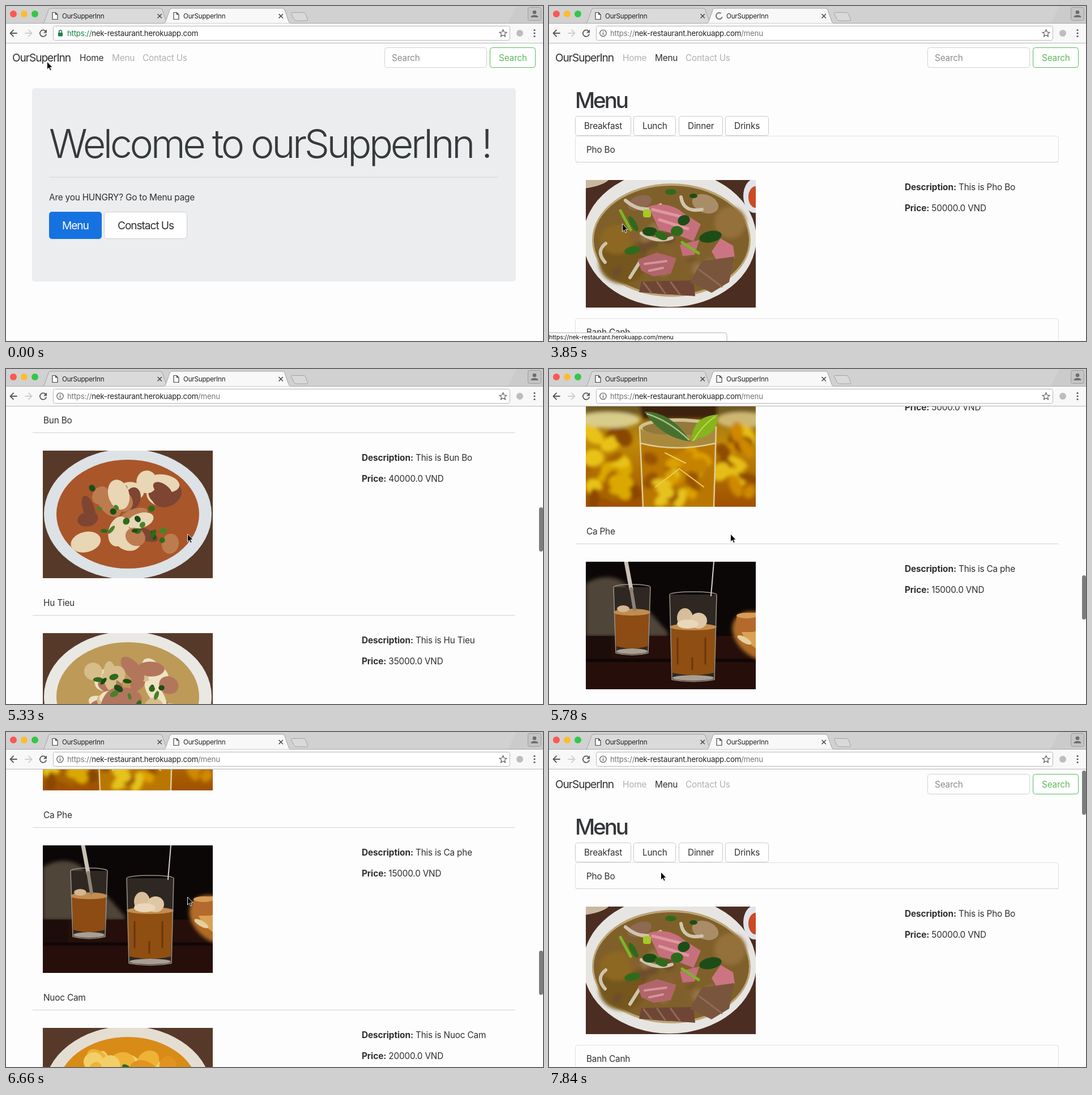
An HTML page for the animation above (7.99 s loop, 948 px wide and 591 px high).

```html
<!DOCTYPE html>
<html lang="en">
<head>
<meta charset="utf-8">
<title>OurSupperInn</title>
<style>
html, body { margin: 0; width: 100%; height: 100%; overflow: hidden; background: #fdfdfd; }
svg { display: block; width: 948px; height: 591px; }
text { font-family: Inter, Roboto, "Liberation Sans", sans-serif; fill: #2d2f31; white-space: pre; }
.body { font-size: 15.4px; letter-spacing: -.23px; }
.strong { font-weight: 700; letter-spacing: -.1px; }
.big { font-size: 19.2px; letter-spacing: -1.1px; }
.hero { font-size: 70px; font-weight: 300; letter-spacing: -4.4px; fill: #373a3c; }
.title { font-size: 38.6px; font-weight: 500; letter-spacing: -3.1px; fill: #343639; }
.tab { font-size: 11.7px; letter-spacing: -.25px; fill: #222; }
.url { font-size: 13.3px; letter-spacing: -.24px; fill: #222; }
.status { font-size: 10.7px; letter-spacing: -.12px; fill: #111; }
</style>
</head>
<body>
<svg id="stage" viewBox="0 0 948 591"></svg>
<script>
const LOOP = 7990, PITCH = 322, MAX = 2844;
const HOST = 'nek-restaurant.herokuapp.com';
const INK = '#2d2f31', FAINT = '#afb1b3';

const text = (x, y, s, cls = 'body', fill = '') =>
  `<text x="${x}" y="${y}" class="${cls}"${fill && ` style="fill:${fill}"`}>${s}</text>`;
const box = (x, y, w, h, fill, stroke = 'none', r = 0) =>
  `<rect x="${x}" y="${y}" width="${w}" height="${h}" rx="${r}" fill="${fill}" stroke="${stroke}"/>`;
const oval = (x, y, rx, ry, fill, turn = 0) =>
  `<ellipse cx="${x}" cy="${y}" rx="${rx}" ry="${ry}" fill="${fill}" transform="rotate(${turn} ${x} ${y})"/>`;
const shape = (d, fill) => `<path d="${d}" fill="${fill}"/>`;
const line = (d, stroke, w = 1) =>
  `<path d="${d}" fill="none" stroke="${stroke}" stroke-width="${w}" stroke-linecap="round" stroke-linejoin="round"/>`;
const group = (id, inner) => `<g id="${id}">${inner}</g>`;
const soften = inner => `<g filter="url(#soft)">${inner}</g>`;
const fade = (id, ...stops) => `<linearGradient id="${id}" x2="0" y2="1">` +
  stops.map((c, i) => `<stop offset="${i / (stops.length - 1)}" stop-color="${c}"/>`).join('') + '</linearGradient>';

let seed = 7;
const rnd = (a, b) => {
  seed = seed * 16807 % 2147483647;
  return a + (b - a) * seed / 2147483647;
};
const scatter = (n, x, y, w, h, size, fills) => Array.from({ length: n }, (_, i) =>
  oval(rnd(x - w, x + w).toFixed(1), rnd(y - h, y + h).toFixed(1), rnd(size / 2, size).toFixed(1),
    rnd(size / 3, size * .7).toFixed(1), fills[i % fills.length], rnd(0, 180) | 0)).join('');

// Food pictures, each 300 by 225
const GREENS = ['#2f6a1c', '#1d4d16', '#47822a'];

const pho = () => box(0, 0, 300, 225, '#4b2d22') + oval(8, 4, 34, 9, '#c9b8a0', -12) +
  oval(298, 28, 20, 30, '#dfe3ea') + oval(300, 30, 13, 19, '#c94a25') +
  oval(148, 103, 153, 121, '#e7e5e2') + oval(151, 106, 140, 100, '#bba578') + oval(151, 106, 137, 96, '#80602a') +
  soften(oval(65, 145, 42, 38, '#75571a') + oval(55, 105, 30, 26, '#8d6820') + oval(255, 75, 28, 28, '#94703a') +
    scatter(18, 145, 110, 90, 62, 18, ['#6d4d2c', '#937346', '#86602f'])) +
  oval(95, 40, 22, 12, '#8d6a51', -20) + oval(211, 42, 24, 16, '#a98d68', 20) +
  line('M70 36Q100 62 132 44M168 30Q172 58 205 52M98 94Q125 112 152 102M35 112Q17 126 34 145M95 145L78 172', '#cfc5ac', 6) +
  shape('M110 47Q145 36 172 58L203 78 190 108 160 96 130 88Z', '#c7707d') +
  line('M118 52L174 66M130 70L180 86', '#dd98a0', 5) +
  shape('M92 140L126 128 160 138 150 165 120 170 98 160Z', '#b0656a') + line('M104 148L142 143M112 160L136 155', '#d3959a', 4) +
  shape('M166 114L200 106 192 132 171 134Z', '#c36e7b') + shape('M238 103L260 116 263 137 230 140 222 126Z', '#cb7582') +
  shape('M98 179L190 177 193 205 94 198Z', '#6f4636') + shape('M205 143L262 135 253 180 222 199 184 180Z', '#79553c') +
  line('M102 181L116 199M126 180L140 200M150 180L166 202M200 158L240 188', '#8f6a55', 3) +
  oval(84, 77, 15, 5, GREENS[0], 60) + oval(113, 91, 13, 8, GREENS[1]) + oval(133, 98, 12, 7, GREENS[0], 25) +
  oval(173, 71, 11, 9, GREENS[1], -20) + oval(161, 90, 11, 9, GREENS[0]) + oval(220, 100, 20, 10, GREENS[1], -12) +
  oval(82, 124, 14, 7, GREENS[0], -12) + oval(150, 21, 10, 5, GREENS[0]) + oval(190, 28, 7, 4, GREENS[1]) +
  line('M61 54L79 88M170 110L199 129', '#7bb527', 5) + box(101, 52, 14, 14, '#a5c927', 'none', 4);

const strands = 'M20 130Q55 100 94 128T135 190M196 25Q215 62 228 90T280 110M205 145Q260 130 240 85M195 95Q190 140 240 150' +
  'M200 190Q250 190 270 150T297 130M24 150Q60 170 115 155M35 100Q80 120 96 85M183 15Q245 45 270 30M190 185Q250 230 280 190M262 60Q262 100 240 120';

const noodles = () => box(0, 0, 300, 225, '#7da5cf') + oval(150, 125, 172, 134, '#c9d8e4') +
  scatter(22, 150, 12, 150, 12, 8, ['#7da5cf', '#dde6eb']) +
  oval(150, 135, 160, 122, '#a7772d') + oval(150, 144, 152, 120, '#b99d62') +
  line(strands, '#957540', 14) + line(strands, '#e8dfc2', 10) + line(strands, '#f6efda', 3) +
  shape('M48 45Q65 8 132 18L122 38 70 53Z', '#a76b20') +
  shape('M32 72Q60 54 100 48L168 27 180 58 128 88 44 82Z', '#a1796a') +
  line('M52 72L112 56M126 48L164 40M90 80L166 58', '#c29a8a', 5) +
  shape('M222 5L239 0 247 50 238 84 219 44Z', '#9c6118') +
  shape('M250 57Q278 45 299 110L290 125 260 90Z', '#a26821') + shape('M3 150Q6 90 39 81L28 140 8 160Z', '#9b641d') +
  line('M12 135L30 95M228 12L238 66M262 66L288 110', '#c08a43', 4) +
  shape('M37 198Q44 145 83 146L98 180 68 225 42 225Z', '#94705f') +
  scatter(40, 195, 95, 36, 24, 8, GREENS) + scatter(40, 138, 164, 58, 18, 8, GREENS) +
  scatter(10, 266, 132, 14, 18, 11, GREENS) + scatter(10, 48, 158, 16, 14, 9, GREENS) +
  shape('M78 198L112 180 160 170 200 170 184 196 130 214 82 214Z', '#b98440') + line('M92 202L180 180', '#d3a763', 5) +
  shape('M83 148L103 106 128 110 150 138 105 162Z', '#7d5036') +
  line('M90 102Q122 68 153 84Q172 100 148 140', '#c9a084', 20) + line('M88 98Q120 67 150 77', '#ecd3bd', 6) +
  scatter(60, 143, 98, 34, 34, 2.2, ['#35251d']);

const dish = (rim, broth, bits) => box(0, 0, 300, 225, '#57392a') + oval(150, 112, 148, 115, rim) +
  oval(150, 112, 126, 96, broth) + scatter(26, 150, 110, 75, 55, 30, bits) + scatter(16, 150, 110, 65, 50, 9, GREENS);

const tea = () => box(0, 0, 300, 225, 'url(#gold)') +
  soften(shape('M0 0H300V62H0Z', '#6f5a24') + shape('M85 0H232V70H100Z', '#3d2410') +
    oval(40, 72, 56, 14, '#d8cc8a') + oval(275, 72, 44, 14, '#cdb873') +
    scatter(22, 42, 150, 40, 62, 22, ['#dba800', '#a86300', '#e8c212', '#8a4700']) +
    scatter(16, 268, 150, 30, 62, 22, ['#cf8900', '#e6bd14', '#8f4c00'])) +
  shape('M94 82Q160 64 230 82L226 225H101Z', '#a98a3c') +
  oval(162, 84, 67, 15, '#cfc193') + oval(162, 87, 62, 12, '#94793a') +
  shape('M97 113Q160 128 229 113L226 225H101Z', '#b97700') +
  soften(scatter(26, 163, 168, 50, 44, 20, ['#dca000', '#e6c21e', '#9a5200', '#c68300'])) +
  line('M123 190L165 158 208 190M140 130L176 148', '#e9cc5d', 2) +
  line('M95 84L101 225M230 84L226 225M97 113Q160 129 229 113', '#dfcd98', 2.5) +
  shape('M103 57Q150 56 185 110Q134 104 103 57Z', '#47702f') + line('M108 61Q148 74 182 107', '#a9bf86', 2.5) +
  shape('M187 110Q186 66 233 62Q234 98 200 104Z', '#86b51c') + line('M228 66Q205 82 190 108', '#c4da55', 2);

const cup = (x, y, w, h, fill) => {
  const top = y + h * .38, foot = y + h - 12;
  return shape(`M${x} ${y}H${x + w}L${x + w - 4} ${y + h}H${x + 4}Z`, '#2f2822') +
    shape(`M${x + 1} ${top}H${x + w - 1}L${x + w - 5} ${foot}Q${x + w / 2} ${foot + 8} ${x + 5} ${foot}Z`, fill) +
    oval(x + w / 2, top, w / 2, 6, '#c28d50') + oval(x + w / 2, y + h - 3, w / 2 - 5, 5, '#a99f92') +
    line(`M${x} ${y}L${x + 4} ${y + h}Q${x + w / 2} ${y + h + 7} ${x + w - 4} ${y + h}L${x + w} ${y}A${w / 2} 5 0 0 0 ${x} ${y}A${w / 2} 5 0 0 1 ${x + w} ${y}`, '#9a948b', 1.5);
};
const coffee = () => box(0, 0, 300, 225, '#0c0707') + soften(shape('M0 38Q35 18 65 35L145 125V132H0Z', '#4f4437')) +
  box(0, 131, 300, 94, '#260f0a') + box(0, 171, 300, 6, '#100606') + box(0, 131, 45, 40, '#1d0d0a') +
  soften(oval(308, 132, 54, 38, '#b06c25', 35)) + oval(314, 126, 46, 30, '#d9a254', 35) +
  box(266, 92, 36, 32, '#b36a2c', 'none', 7) + oval(284, 95, 18, 5, '#d79c56') + oval(280, 138, 14, 5, '#e6cf9e', 30) +
  cup(49, 45, 65, 116, '#8d4c13') + line('M71 0L80 48', '#c9c2b5', 7) + line('M80 48L86 84', '#8c8376', 6) +
  cup(148, 58, 83, 150, '#8f4f12') + line('M226 0L221 60', '#d5d0c8', 2) +
  oval(66, 83, 11, 6, '#d5b592') + oval(175, 99, 14, 17, '#d8bd9a') + oval(199, 104, 15, 14, '#dfc6a4') + oval(180, 110, 19, 8, '#ead6b8') +
  line('M162 135V180M188 170V190M211 135V180', '#6a360b', 3);

const avocado = () => box(0, 0, 300, 225, '#888786') + box(0, 80, 300, 38, '#bab9b8') + box(0, 112, 300, 113, '#c9c9cc') +
  soften(scatter(34, 150, 172, 148, 48, 19, ['#b3b3b9', '#dddde0', '#a8a8ae', '#e6e6e7'])) +
  oval(272, 104, 40, 10, '#d9dacd') + shape('M231 101H312V180Q255 194 237 157Z', '#c4c7b1') + oval(273, 105, 36, 8, '#b6c193') +
  shape('M94 144H160Q154 184 125 184T94 144Z', '#deddda') + oval(127, 143, 32, 14, '#efede6') + oval(127, 140, 26, 13, '#c4a561') +
  oval(52, 168, 32, 34, '#292c2e', -15) + oval(46, 157, 17, 18, '#3a3e3e') +
  shape('M80 139Q150 154 143 207Q130 225 105 207Q84 185 80 139Z', '#303322') +
  shape('M82 136Q142 154 142 192Q130 215 108 196Q85 173 82 136Z', '#b9b842') + oval(117, 176, 18, 20, '#d5ca68', -25) + oval(115, 176, 12, 15, '#756026', -25) +
  shape('M146 187L212 180 264 193 185 216Z', '#2e3036') +
  shape('M161 62H240L228 196Q199 204 173 196Z', '#8fa85d') + shape('M164 70H238L230 188Q199 195 174 188Z', '#91ac57') +
  oval(200, 69, 38, 9, '#d4dab6') + line('M181 78L186 186M204 78V190M223 78L218 186', '#b1c57e', 5) +
  line('M162 55L173 196Q200 204 228 196L240 55', '#dfe3d5', 3) + oval(198, 67, 9, 6, '#b52a29') + oval(215, 63, 11, 5, '#4c8731');

const water = () => box(0, 0, 300, 225, 'url(#blue)') +
  shape('M113 0H300V145Q278 144 259 116L233 84 190 68 151 49Q111 47 113 0Z', '#3863b9') +
  shape('M117 0H300V46L170 49Q126 42 117 0Z', '#7595ce') + shape('M151 51L300 25V58L170 62Z', '#a9c5e8') +
  shape('M170 65L300 47V59Q248 60 262 110Q282 132 300 129V146Q271 143 252 111L231 84Z', '#b6cde9') +
  shape('M265 82Q274 46 300 55V110Q276 112 265 82Z', '#25448d') +
  line('M200 0Q174 37 146 50Q119 39 114 0', '#dcecff', 2) +
  shape('M124 50H158Q153 68 149 83L152 128H146L143 85Q126 76 124 50Z', '#a3c5f0') +
  line('M129 54Q132 77 146 85L148 126M155 54L149 83', '#eaf5ff', 2) + scatter(10, 272, 16, 22, 8, 2.5, ['#b8d2f1']) +
  shape('M62 131Q120 116 178 131L180 225H61Z', '#4d83dc') + shape('M62 164Q120 149 179 164L180 225H61Z', '#76b1ed') +
  scatter(24, 120, 196, 50, 27, 19, ['#9fcdf5', '#5d9fe6', '#c5e3fa', '#78b3ed']) +
  oval(121, 167, 57, 11, '#9bcaf4') + shape('M96 162L108 146 146 147 156 161 138 167Z', '#d5eafb') +
  line('M66 132L61 225M175 132L180 225', '#a3c9f5', 2) +
  '<ellipse cx="121" cy="131" rx="55" ry="8" fill="none" stroke="#bddcff" stroke-width="2"/>';

const items = [
  ['Pho Bo', 50000, pho],
  ['Banh Canh', 30000, noodles],
  ['Com Tam', 35000, () => dish('#e6e3db', '#d8c79f', ['#9a622e', '#eee5cd', '#bc8c48'])],
  ['Bun Bo', 40000, () => dish('#dde2e6', '#a9562a', ['#e8d6b4', '#7d4532', '#bd7b50'])],
  ['Hu Tieu', 35000, () => dish('#e9e8e3', '#bd9a58', ['#efe2c2', '#b2765d', '#d6bd8a'])],
  ['Tra Da', 5000, tea],
  ['Ca Phe', 15000, coffee, 'Ca phe'],
  ['Nuoc Cam', 20000, () => dish('#e4ded2', '#d98b18', ['#eeb236', '#e0941f', '#f2cf69'])],
  ['Sinh To', 30000, avocado],
  ['Nuoc Loc', 5000, water, 'Nuoc Loc', '(water)']
];

// Page parts
const button = (x, y, w, h, label, tx) => box(x + .5, y + .5, w - 1, h - 1, '#fff', '#c9cacb', 4) + text(tx, y + 23, label);

const nav = (y, active) => text(11, y + 25, 'OurSuperInn', 'big') +
  [['Home', 130], ['Menu', 187], ['Contact Us', 241]].map(([s, x]) =>
    text(x, y + 24, s, 'body', s === active ? INK : FAINT)).join('') +
  box(668.5, y + .5, 180, 35, '#fff', '#cfd0d1', 4) + text(681, y + 24, 'Search', 'body', '#8b8d8f') +
  box(854.5, y + .5, 80, 35, '#fff', '#5cb85c', 4) + text(870, y + 24, 'Search', 'body', '#5cb85c');

const home = nav(73, 'Home') + box(46, 145, 854, 341, '#ebedee', 'none', 5) +
  text(76, 268, 'Welcome to ourSupperInn !', 'hero') + box(76, 301.5, 794, 1, '#d5d7d8') +
  text(76, 342.5, 'Are you HUNGRY? Go to Menu page') +
  '<rect id="go" x="76" y="363" width="93" height="48" rx="5"/>' + text(99, 394, 'Menu', 'big', '#fff') +
  box(173.5, 363.5, 146, 47, '#fff', '#cccdce', 5) + text(197, 394, 'Constact Us', 'big');

const row = ([name, price, art, label = name, extra], i) => {
  const y = 308 + i * PITCH;
  return `<rect class="card" x="46.5" y="${y - 77.5}" width="853" height="46" rx="4" fill="none" stroke="#dfe0e1"/>` +
    box(47, y - 32, 852, 1, '#d0d1d2') + text(66, y - 48.5, name) +
    `<svg x="65" y="${y}" width="300" height="225">${art()}</svg>` +
    text(628, y + 17.5, `<tspan class="strong">Description:</tspan> This is ${label}`) +
    (extra ? text(628, y + 40, extra) : '') +
    text(628, y + (extra ? 77.5 : 55), `<tspan class="strong">Price:</tspan> ${price}.0 VND`);
};

const menu = nav(74, 'Menu') + text(46, 181, 'Menu', 'title') +
  button(46, 195, 99, 35, 'Breakfast', 62) + button(149, 195, 75, 35, 'Lunch', 165) +
  button(229, 195, 78, 35, 'Dinner', 245) + button(311, 195, 77, 35, 'Drinks', 327) + items.map(row).join('');

// Browser frame
const tab = (x, w, fill) =>
  `<path d="M${x} 30.5Q${x + 3} 30 ${x + 4} 27L${x + 11} 7Q${x + 12} 4 ${x + 15} 4H${x + w - 15}Q${x + w - 12} 4 ${x + w - 11} 7L${x + w - 4} 27Q${x + w - 3} 30 ${x + w} 30.5" fill="${fill}" stroke="#a3a3a4"/>`;
const sheet = x => `<path d="M${x} 11.5h5.5l3.5 3.5v8.5h-9zM${x + 5.5} 11.5v3.5h3.5" fill="#fff" stroke="#444" stroke-width="1.2"/>`;
const close = x => line(`M${x - 3} 14.5l6.5 6.5m0-6.5l-6.5 6.5`, '#4b4b4b', 1.6);

const frame = box(0, 0, 948, 31, '#d1d1d2') + shape('M901 0H948V30H886Z', '#cbcbcc') +
  oval(13, 14, 6, 6, '#fc5753') + oval(32, 14, 6, 6, '#fdbc2f') + oval(51, 14, 6, 6, '#33c748') +
  tab(64, 223, '#dadadb') + box(0, 30, 948, 1, '#a9a9aa') + tab(278, 225, '#f8f8f8') +
  sheet(82) + text(99, 21.7, 'OurSupperInn', 'tab') + close(271) +
  group('icon', sheet(296)) + group('spin', line('M295 17.5a5.5 5.5 0 1 1 5.5 5.5', '#777', 2)) +
  text(313, 21.7, 'OurSupperInn', 'tab') + close(485) +
  '<path d="M505 11.5h20q3 0 4 3l3.5 9q1 2.5-2 2.5h-18q-3 0-4-2.5l-4.5-9q-1.5-3 1-3z" fill="#d9d9da" stroke="#a3a3a4"/>' +
  box(921.5, 2.5, 23, 23, '#c4c4c5', '#9c9c9d', 3) + oval(933, 11, 3.3, 3.3, '#6d6d6e') + shape('M926.5 20q0-4 6.5-4t6.5 4z', '#6d6d6e') +
  box(0, 31, 948, 34, '#f8f8f8') + box(0, 65, 948, 1, '#b9b9ba') +
  line('M19 48H8m5-5.5L7.5 48l5.5 5.5', '#5a5a5a', 1.8) + line('M34 48h11m-5-5.5l5.5 5.5-5.5 5.5', '#cfcfcf', 1.8) +
  line('M70 44.5a5.7 5.7 0 1 0 1 5.5', '#5a5a5a', 1.8) + shape('M72 41.5v6h-6z', '#5a5a5a') +
  box(83.5, 35.5, 806, 25, '#fff', '#b9b9ba', 3) +
  group('lock', box(92, 47, 8, 6.5, '#1b8043', 'none', 1) + line('M93.7 47v-2a2.3 2.3 0 0 1 4.6 0v2', '#1b8043', 1.5)) +
  group('info', '<circle cx="95.5" cy="48" r="5.7" fill="none" stroke="#666" stroke-width="1.3"/>' +
    box(94.8, 47, 1.5, 4.2, '#666') + box(94.8, 44.5, 1.5, 1.5, '#666')) +
  group('url', '') +
  '<path d="M877.5 41.8l1.8 4.2 4.5.4-3.4 3 1 4.4-3.9-2.3-3.9 2.3 1-4.4-3.4-3 4.5-.4z" fill="none" stroke="#5a5a5a" stroke-width="1.2"/>' +
  oval(907, 48, 6, 6, '#bdbdbe') + [42.5, 48, 53.5].map(y => oval(933, y, 1.6, 1.6, '#5a5a5a')).join('');

const pointers = group('arrow', '<path d="M.5 0V14L3.7 11l2.2 5 2.3-1-2.2-4.8H10.2Z" fill="#000" stroke="#fff" stroke-width=".9"/>') +
  group('beam', line('M-3-7Q0-7 0-4V4Q0 7-3 7M3-7Q0-7 0-4M0 4Q0 7 3 7M-1.5 3h3', '#333', 1.2)) +
  group('hand', '<path d="M-1.5 1q1.5-2 3 0v5q2-1 2.5.5 2-1 2.5.5 2.5-.5 2.5 2v3l-2 5h-7L-5 10.5q-1-2.5 1-2l2.5 2z" fill="#fff" stroke="#000"/>');

const stage = document.getElementById('stage');
stage.innerHTML = '<defs>' + fade('gold', '#6d5826', '#c08a08', '#a05000') + fade('blue', '#184cb4', '#3270d5', '#4ca4ed') +
  '<filter id="soft"><feGaussianBlur stdDeviation="3"/></filter>' +
  '<clipPath id="view"><rect y="66" width="948" height="525"/></clipPath></defs>' +
  box(0, 0, 948, 591, '#fdfdfd') +
  `<g clip-path="url(#view)">${group('home', home)}${group('menu', menu)}</g>` +
  '<rect id="thumb" x="941" width="7" rx="3.5" fill="#7c7c7d"/>' + frame +
  group('status', '<path d="M-1 576.5H310q4 0 4 4V592H-1z" fill="#fdfdfd" stroke="#b5b5b6"/><text id="link" class="status" x="0" y="588"></text>') +
  group('pointer', pointers);

const el = {};
stage.querySelectorAll('[id]').forEach(n => el[n.id] = n);
const cards = stage.querySelectorAll('.card');
const show = (node, on) => node.setAttribute('visibility', on ? 'visible' : 'hidden');

// Bursts of even steps: start, end, count
const bursts = [[1200, 2220, 8], [2370, 2670, 3], [3420, 4000, 5], [4300, 4590, 3],
  [4890, 5930, 8], [6070, 7100, 8], [7250, 7840, 5]];
const path = [[1060, 72, 98], [2220, 131, 343], [2670, 129, 384], [4150, 129, 384],
  [4590, 320, 291], [7400, 320, 291], [7840, 197, 247]];
const scroll = [[4740, 1], [4890, 254], [5330, 1120], [5781, 1899], [5930, 2240], [6070, 2600], [6217, 2883],
  [6364, 2855], [6511, 2680], [6806, 1400], [6953, 620], [7100, -38], [7250, -24], [7400, -12], [7690, -2], [7840, 0]];

const snap = t => {
  const b = bursts.filter(b => t >= b[0]).pop();
  if (!b) return 0;
  const step = (b[1] - b[0]) / (b[2] - 1);
  return b[0] + step * Math.min(b[2] - 1, Math.floor((t - b[0]) / step + .05));
};
const at = (keys, t, k) => {
  const i = keys.findIndex(key => key[0] > t);
  if (i === 0) return keys[0][k];
  if (i < 0) return keys[keys.length - 1][k];
  const a = keys[i - 1], b = keys[i];
  return a[k] + (b[k] - a[k]) * (t - a[0]) / (b[0] - a[0]);
};

function draw(time) {
  const t = snap(time), onMenu = t > 3850, y = Math.round(at(scroll, t, 1));
  show(el.home, !onMenu);
  show(el.menu, onMenu);
  el.menu.setAttribute('transform', `translate(0 ${-y})`);
  cards.forEach(c => c.setAttribute('stroke', y > 20 ? 'none' : '#dfe0e1'));
  el.go.setAttribute('fill', t > 2500 ? '#125cad' : '#1672e0');

  const over = Math.max(0, -y, y - MAX);
  show(el.thumb, t >= 4890);
  el.thumb.setAttribute('y', 68 + Math.min(MAX, Math.max(0, y)) / 6.42 + (y > MAX ? over * .17 : 0));
  el.thumb.setAttribute('height', 78 - over * .17);

  const loading = t >= 3420 && t < 3990;
  show(el.icon, !loading);
  show(el.spin, loading);
  el.spin.setAttribute('transform', `rotate(${-t * .6 % 360} 300.5 17.5)`);
  show(el.lock, !onMenu);
  show(el.info, onMenu);
  const soft = s => `<tspan style="fill:${onMenu ? '#777' : '#1b8043'}">${s}</tspan>`;
  el.url.innerHTML = text(108, 52.5, soft('https://') + HOST + (onMenu ? soft('/menu') : ''), 'url');

  show(el.status, t > 1300 && t < 4400);
  el.link.textContent = 'https://' + HOST + (t > 2500 ? '/menu' : '');

  const kind = t > 2200 && t < 2300 ? 'beam' : t > 2500 && t < 3850 ? 'hand' : 'arrow';
  ['arrow', 'beam', 'hand'].forEach(k => show(el[k], k === kind));
  el.pointer.setAttribute('transform', `translate(${at(path, t, 1)} ${at(path, t, 2)})`);
}

const start = performance.now();
function tick() {
  draw((performance.now() - start) % LOOP);
  requestAnimationFrame(tick);
}
tick();
</script>
</body>
</html>
```
